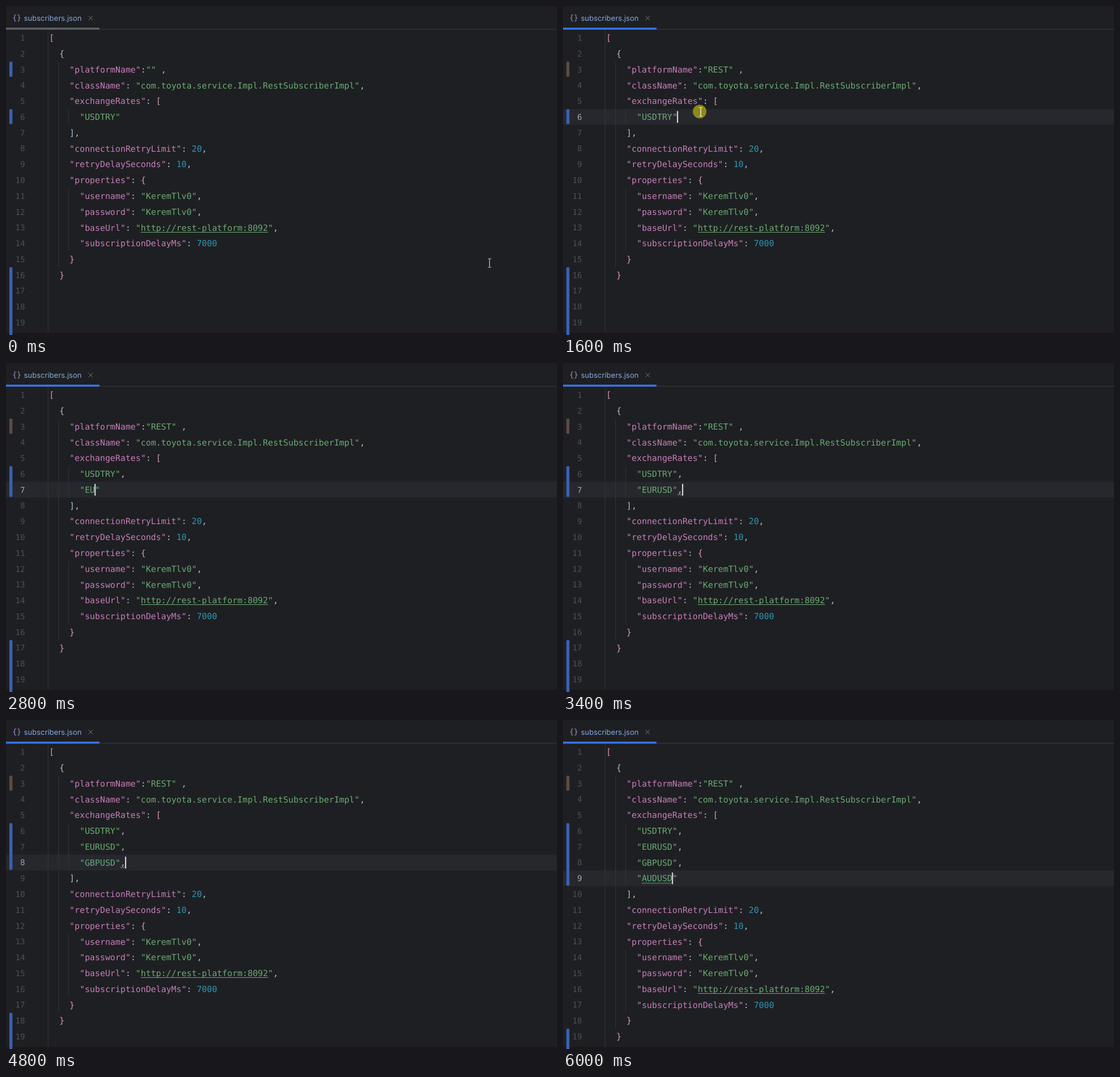
An HTML page with a canvas that plays this animation: 968x578 px, repeating every 6.2 s.

```html
<!DOCTYPE html>
<html lang="en">
<head>
<meta charset="utf-8">
<title>subscribers.json</title>
<style>
html, body { margin: 0; width: 100%; height: 100%; overflow: hidden; background: #1e1f22; }
canvas { display: block; }
</style>
</head>
<body>
<canvas id="stage" width="968" height="578"></canvas>
<script>
const ctx = document.getElementById('stage').getContext('2d');
const LOOP = 6200, STEP = 200;
const LEFT = 75.8, CHAR = 8.944, TOP = 42.1, ROW = 27.78;
const MONO = '"DejaVu Sans Mono", "Noto Sans Mono", monospace';
const RED = '#c75450', GREEN = '#6aab73', BLUE = '#3a60b2';

// [first step, row within exchangeRates, text with | as the caret]
const edits = [
  [8, 0, '"USDTRY"|'], [10, 0, '"USDTRY",|'],
  [11, 1, '|'], [12, 1, '"|"'], [13, 1, '"E|"'], [14, 1, '"EU|"'],
  [15, 1, '"EURU|"'], [16, 1, '"EURUSD|"'], [17, 1, '"EURUSD",|'],
  [18, 2, '"|"'], [19, 2, '"G|"'], [20, 2, '"GBP|"'],
  [21, 2, '"GBPU|"'], [22, 2, '"GBPUSD|"'], [24, 2, '"GBPUSD",|'],
  [25, 3, '|'], [26, 3, '"|"'], [27, 3, '"A|"'], [28, 3, '"AUD|"'],
  [29, 3, '"AUDU|"'], [30, 3, '"AUDUSD|"']
];

// [step, x, y, pressed]
const moves = [
  [0, 849.5, 451.5], [1, 735, 388], [2, 410, 205], [3, 257.5, 119.5, true],
  [4, 257.5, 119.5], [7, 248, 154], [8, 242, 186, true], [9, 242, 186]
];

const rowTop = n => TOP + (n - 1) * ROW;
const rowMid = n => rowTop(n) + ROW / 2;
const colX = c => LEFT + c * CHAR;

function rect(x, y, w, h, color, radius = 0) {
  ctx.fillStyle = color;
  ctx.beginPath();
  ctx.roundRect(x, y, w, h, radius);
  ctx.fill();
}

function stroke(points, color, width = 1) {
  ctx.strokeStyle = color;
  ctx.lineWidth = width;
  ctx.beginPath();
  points.forEach(([x, y]) => ctx.lineTo(x, y));
  ctx.stroke();
}

function text(str, x, y, color, font, align = 'left') {
  ctx.font = font;
  ctx.textAlign = align;
  ctx.fillStyle = color;
  ctx.fillText(str, x, y);
}

function wave(col, count, row, color) {
  const points = [];
  const y = rowMid(row) + 8.5;
  for (let x = 0; x <= count * CHAR; x += 2) points.push([colX(col) + x, y + (x % 4 ? 1.2 : -1.2)]);
  stroke(points, color);
}

function marker(from, to, color = BLUE) {
  rect(5.9, rowTop(from) + 0.2, 5.4, rowTop(to + 1) - rowTop(from) - 1.4, color, 1.5);
}

function tokenColor(token, isKey, row) {
  if (token[0] === '"') return isKey ? '#c77dbb' : GREEN;
  if (/\d/.test(token)) return '#2b98b6';
  if (token === ']') return '#9cc0dc';
  if (/[[{}]/.test(token)) return row === 2 ? '#a9b9d2' : '#d79aa6';
  return '#bcbec4';
}

function codeLine(line, row) {
  for (const m of line.matchAll(/"[^"]*"|\d+|[[\]{}:,]/g)) {
    const isKey = line[m.index + m[0].length] === ':';
    const color = tokenColor(m[0], isKey, row);
    text(m[0], colX(m.index), rowMid(row) + 5.2, color, '14.857px ' + MONO);
    if (m[0].startsWith('"http')) {
      rect(colX(m.index + 1), Math.round(rowMid(row) + 7.2), (m[0].length - 2) * CHAR, 1, GREEN);
    }
  }
}

function editor(step) {
  const edit = edits.filter(e => e[0] <= step).pop();
  const rates = ['"USDTRY"', '"EURUSD"', '"GBPUSD"'];
  const last = edit ? edit[1] : 0;
  const current = edit ? edit[2] : '"USDTRY"';
  const rateLines = rates.slice(0, last).map(r => r + ',').concat(current.replace('|', ''));
  const platform = step < 5 ? '' : step < 6 ? 'RE' : 'REST';
  const lines = [
    '[',
    '  {',
    `    "platformName":"${platform}" ,`,
    '    "className": "com.toyota.service.Impl.RestSubscriberImpl",',
    '    "exchangeRates": [',
    ...rateLines.map(r => '      ' + r),
    '    ],',
    '    "connectionRetryLimit": 20,',
    '    "retryDelaySeconds": 10,',
    '    "properties": {',
    '      "username": "KeremTlv0",',
    '      "password": "KeremTlv0",',
    '      "baseUrl": "http://rest-platform:8092",',
    '      "subscriptionDelayMs": 7000',
    '    }',
    '  }'
  ];

  let row = 0, col = 0;
  if (edit) {
    row = 6 + last;
    col = 6 + current.indexOf('|');
  } else if (step >= 3) {
    row = 3;
    col = 20 + platform.length;
  }
  if (row) rect(0, rowTop(row), 968, ROW, '#26282e');

  const guide = (x, from, to) => rect(x, rowTop(from), 1, rowTop(to + 1) - rowTop(from), '#323438');
  rect(73.5, 42, 1, 532, '#323438');
  guide(92, 3, 15 + last);
  guide(109.5, 6, 6 + last);
  guide(109.5, 11 + last, 14 + last);

  marker(3, 3, step < 7 ? BLUE : '#5c4a45');
  marker(6, 6 + last);
  marker(16 + last, 20);

  for (let n = 1; n <= 19; n++) {
    text(n, 33.3, rowMid(n) + 5, n === row ? '#a6a4b2' : '#4b5059', '13.95px ' + MONO, 'right');
  }
  lines.forEach((line, i) => codeLine(line, i + 1));

  if (step === 11 || step === 12) wave(14, 1, 6, RED);
  if (step === 25 || step === 26) wave(14, 1, 8, RED);
  if (current.endsWith(',|') && last) wave(14, 1, row, '#8a8d85');
  if (/[A-Z]{6}\|"/.test(current)) wave(7, 6, row, '#5f9a68');
  if (row) rect(colX(col) - 0.8, rowMid(row) - 10.3, 2, 20.6, '#e2e3e8');
}

function tab(step) {
  text('{}', 11.2, 25.4, '#a68bc8', '13px ' + MONO);
  text('subscribers.json', 31.4, 25.6, '#86a8dc', '13px Inter, sans-serif');
  stroke([[145, 17.5], [152.5, 25]], '#777a82');
  stroke([[152.5, 17.5], [145, 25]], '#777a82');
  rect(0, 40.5, 968, 1, '#3a3c41');
  rect(-4, 38, 168.5, 3.5, step < 3 ? '#5d6066' : '#3574f0', 1.5);
}

function pointer(step) {
  if (step > 9 || step === 5 || step === 6) return;
  const [, x, y, pressed] = moves.filter(m => m[0] <= step).pop();
  if (pressed) rect(x - 14, y - 12.5, 24, 24, '#8d8918', 12);
  const color = step < 3 ? '#c9bdc3' : '#f0f0f0';
  stroke([[x, y - 7], [x, y + 7]], color, 1.3);
  stroke([[x - 3, y - 7.5], [x + 3, y - 7.5]], color);
  stroke([[x - 3, y + 7.5], [x + 3, y + 7.5]], color);
}

function draw(now) {
  const step = Math.floor((now % LOOP) / STEP);
  ctx.textRendering = 'geometricPrecision';
  rect(0, 0, 968, 578, '#1e1f22');
  rect(0, 574.5, 968, 3.5, '#1a161a');
  editor(step);
  tab(step);
  pointer(step);
}

const start = performance.now();
function tick() {
  draw(performance.now() - start);
  requestAnimationFrame(tick);
}
tick();
</script>
</body>
</html>
```
